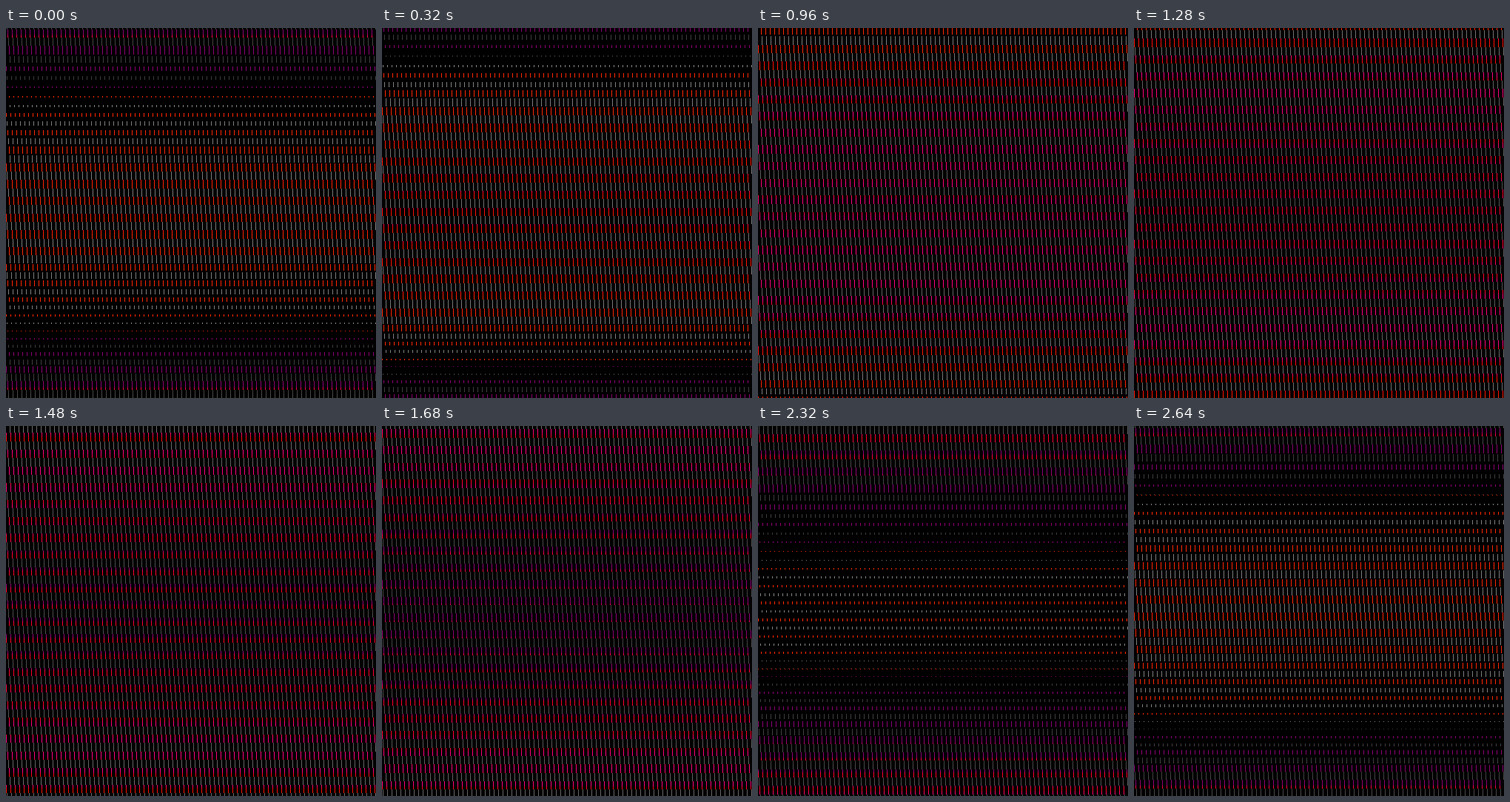
Recreate the animation shown at these times as an HTML page with a canvas. Size 500x500 px, loop 2.68 s.

```html
<!DOCTYPE html>
<html>
<head>
<meta charset="utf-8">
<style>
  html, body { margin: 0; width: 100%; height: 100%; overflow: hidden; background: #000; }
  canvas { display: block; width: 500px; height: 500px; }
</style>
</head>
<body>
<canvas id="stage" width="500" height="500"></canvas>
<script>
const SIZE = 500, LOOP = 2680, STEP = 40;
const COLUMNS = 6;               // the pattern repeats every 6 px across
const CELL = 11.325;             // height of a tick; each next cell steps 1 px right
const RISE = CELL * COLUMNS;     // upward scroll per loop
const TOP = 6.8;                 // middle of the first cell at time 0
const CENTRE = 249;
const CURVE = 0.0187;            // delay grows with the square of the distance
const SPREAD = 480;              // phase lead of a cell's top over its bottom
const DARK_FROM = 2230, DARK_TO = 2640;

const mod = (a, n) => ((a % n) + n) % n;
const ramp = (v, from, to) => Math.min(1, Math.max(0, (v - from) / (to - from)));

const ctx = document.getElementById('stage').getContext('2d');

// Orange, red, magenta, red, purple; grey ticks only fade.
function shade(phase, coloured) {
  const p = mod(phase, LOOP);
  if (p >= DARK_FROM && p < DARK_TO) return null;
  const s = p >= DARK_TO ? 0 : p;
  if (!coloured) {
    const grey = 130 - 72 * s / DARK_FROM;
    return `rgb(${grey}, ${grey}, ${grey})`;
  }
  const red = 255 - 115 * ramp(s, 1680, 1820);
  const green = 40 * (1 - ramp(s, 200, 700));
  const blue = 128 * ramp(s, 620, 900) - 100 * ramp(s, 1210, 1500) + 88 * ramp(s, 1550, 1800);
  return `rgb(${red}, ${green}, ${blue})`;
}

function draw(time) {
  const scroll = RISE * time / LOOP;
  ctx.fillStyle = '#000';
  ctx.fillRect(0, 0, SIZE, SIZE);
  for (let y = 0; y < SIZE; y++) {
    const pos = (y + scroll - TOP) / CELL + 0.5;
    const cell = Math.floor(pos);
    const lead = SPREAD * (1 - (pos - cell));
    const colour = shade(time - CURVE * (y - CENTRE) ** 2 + lead, cell % 2 === 0);
    if (!colour) continue;
    ctx.fillStyle = colour;
    for (let x = mod(cell - 4, COLUMNS); x < SIZE; x += COLUMNS) ctx.fillRect(x, y, 1, 1);
  }
}

const start = performance.now();
let shown = -1;
function tick() {
  const time = Math.floor((performance.now() - start) % LOOP / STEP) * STEP;
  if (time !== shown) draw(shown = time);
  requestAnimationFrame(tick);
}
tick();
</script>
</body>
</html>
```
